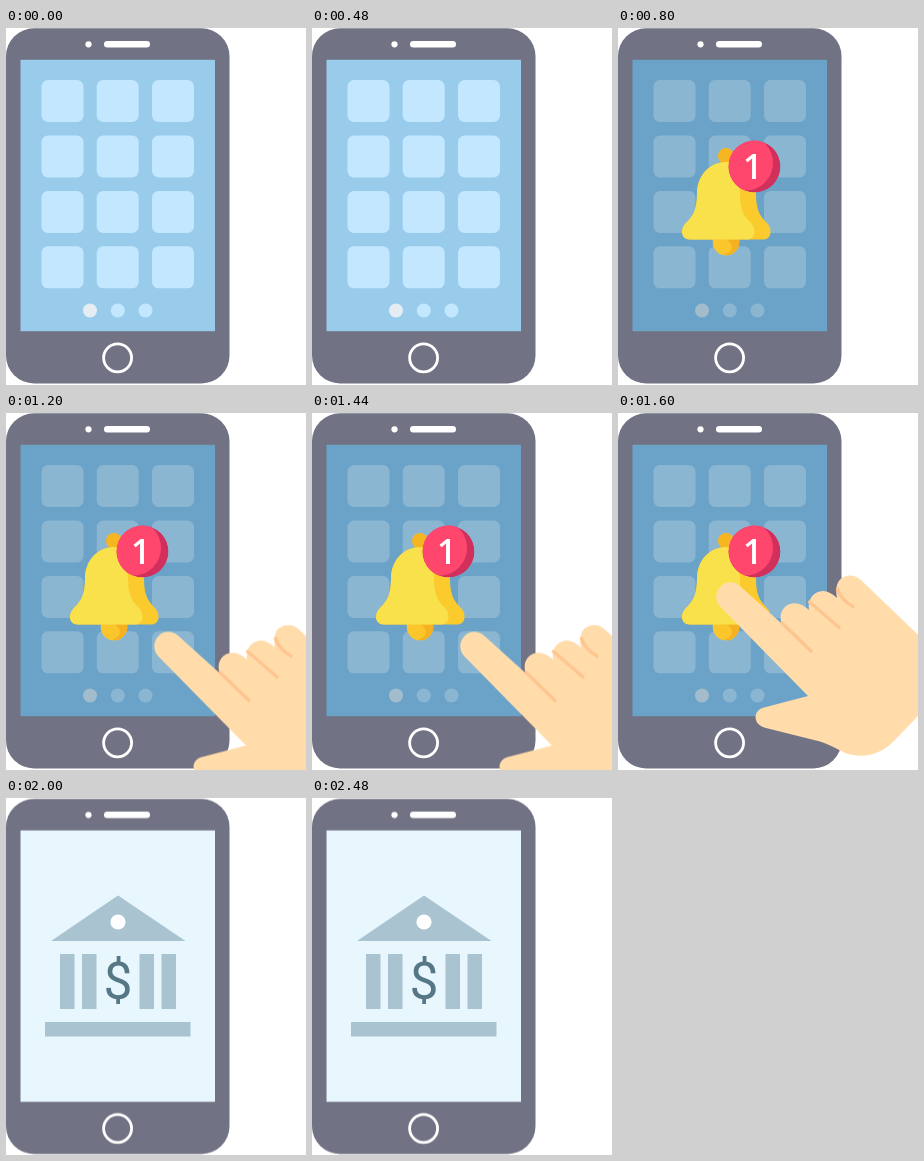
These frames come from a looping animation (300x357 px, 2.8 s). An HTML page:

```html
<!DOCTYPE html>
<html lang="en">
<head>
<meta charset="utf-8">
<title>Phone notification</title>
<style>
  html, body { margin: 0; width: 100%; height: 100%; overflow: hidden; background: #fff; }
  svg { display: block; width: 100%; height: 100%; }

  .screen, .tiles, .dot, .alert, .hand, .bank, .phone { animation: 2800ms step-end infinite; }
  .phone  { animation-name: phone; }
  .screen { animation-name: screen; }
  .tiles  { animation-name: tiles; }
  .dot    { animation-name: dot; }
  .alert  { animation-name: alert; }
  .hand   { animation-name: hand; }
  .bank   { animation-name: bank; }

  /* home 0-800, alert 800-2000, hand 1200-2000, bank 2000-2800 ms */
  @keyframes phone {
    0% { transform: none; }
    71.428% { transform: translateY(.6px); }
  }
  @keyframes screen {
    0% { fill: #99cceb; }
    28.571% { fill: #6ba3c8; }
    71.428% { fill: #e8f6fe; }
  }
  @keyframes tiles {
    0% { fill: #c2e7ff; visibility: visible; }
    28.571% { fill: #8ab6d2; visibility: visible; }
    71.428% { visibility: hidden; }
  }
  @keyframes dot {
    0% { fill: #e5edf3; visibility: visible; }
    28.571% { fill: #a3bccb; visibility: visible; }
    71.428% { visibility: hidden; }
  }
  @keyframes alert {
    0% { visibility: hidden; }
    28.571% { visibility: visible; }
    71.428% { visibility: hidden; }
  }
  @keyframes hand {
    0% { visibility: hidden; transform: translate(50px, 49.5px); }
    42.857% { visibility: visible; transform: translate(50px, 49.5px); }
    57.142% { visibility: visible; transform: none; }
    71.428% { visibility: hidden; }
  }
  @keyframes bank {
    0% { visibility: hidden; }
    71.428% { visibility: visible; }
  }
</style>
</head>
<body>
<svg viewBox="0 0 300 357" preserveAspectRatio="none">
  <defs>
    <g id="row">
      <rect x="35.5" width="42" height="42" rx="6.5"/>
      <rect x="90.7" width="42" height="42" rx="6.5"/>
      <rect x="146" width="42" height="42" rx="6.5"/>
    </g>
    <clipPath id="badge"><circle cx="136.5" cy="138.5" r="26"/></clipPath>
  </defs>

  <g class="phone">
    <rect y=".3" width="223.5" height="355.2" rx="28" fill="#717385"/>
    <circle cx="82.5" cy="16.3" r="3.1" fill="#fff"/>
    <rect x="98" y="13" width="46" height="6.6" rx="3.3" fill="#fff"/>
    <circle cx="111.6" cy="329.8" r="14" fill="none" stroke="#fff" stroke-width="2.8"/>
    <rect class="screen" x="14.5" y="31.8" width="194.5" height="271.4"/>
  </g>

  <g class="tiles">
    <use href="#row" y="52"/>
    <use href="#row" y="107.5"/>
    <use href="#row" y="163"/>
    <use href="#row" y="218.3"/>
    <circle cx="111.8" cy="282.5" r="7"/>
    <circle cx="139.5" cy="282.5" r="7"/>
  </g>
  <circle class="dot" cx="84" cy="282.5" r="7"/>

  <g class="alert">
    <circle cx="108" cy="128" r="8" fill="#f6b621"/>
    <circle cx="108" cy="214" r="13.3" fill="#fbc62c"/>
    <path d="M108 200H121.3V214A13.3 13.3 0 0 1 106 227.1C114 224 118 218 108 211Z" fill="#f5b120"/>
    <path d="M108.500 134C126 134 138 148 138 166C138 182 142 188 149 195C152 198 152.500 201 152.500 204C152.500 209 149 211.500 145 211.500H72C67 211.500 64 208 64 204C64 200 66 197 68 195C75 188 79 182 79 166C79 148 91 134 108.500 134Z" fill="#fbca2d"/>
    <path d="M108.500 134C117 136 122 149 122 166C122 182 126 188 133 195C139 202 137 211.500 129 211.500H72C67 211.500 64 208 64 204C64 200 66 197 68 195C75 188 79 182 79 166C79 148 91 134 108.500 134Z" fill="#f9e14c"/>
    <g clip-path="url(#badge)">
      <circle cx="136.500" cy="138.500" r="26" fill="#d1305d"/>
      <circle cx="127.500" cy="135" r="27.500" fill="#ff476e"/>
    </g>
    <text x="134.600" y="150.800" font-family="'Open Sans', sans-serif" font-weight="600" font-size="34" text-anchor="middle" fill="#fff">1</text>
  </g>

  <g class="hand">
    <path d="M102 193.500C97 188 97 179 102.500 173.500C108 168 116 168 122 173L164 211C161 204 163 197 168 193C175 188 184 190 191 197C190 190 192 184 197 180.500C204 175.500 212 178 219 185C217 176 219 168 224 165C231 160.500 238 162.500 243 167L370 289V350L300 303L276 328C262 342 245 346 227 340C219 336 210 330 196 327L148 315C141 313 137.500 309 137.500 304C138 298 142 295 148 294L190 283Z" fill="#ffdcaa"/>
    <path d="M164 210L193 238M191.500 189L221 214.500M219.500 176Q223 187 235 193.500" fill="none" stroke="#ffc590" stroke-width="3.400" stroke-linecap="round"/>
  </g>

  <g class="bank" fill="#a9c3d0">
    <path d="M45 143L112 97.500L179.500 143Z"/>
    <circle cx="112" cy="124" r="7.600" fill="#fff"/>
    <path d="M54 156h14.500v55H54zM76 156h14.500v55H76zM133.500 156H148v55h-14.500zM155.500 156H170v55h-14.500zM39 224h145.500v14.500H39z"/>
    <text x="112" y="201.400" font-family="Roboto, sans-serif" font-size="51.500" text-anchor="middle" fill="#567786">$</text>
  </g>
</svg>
</body>
</html>
```
